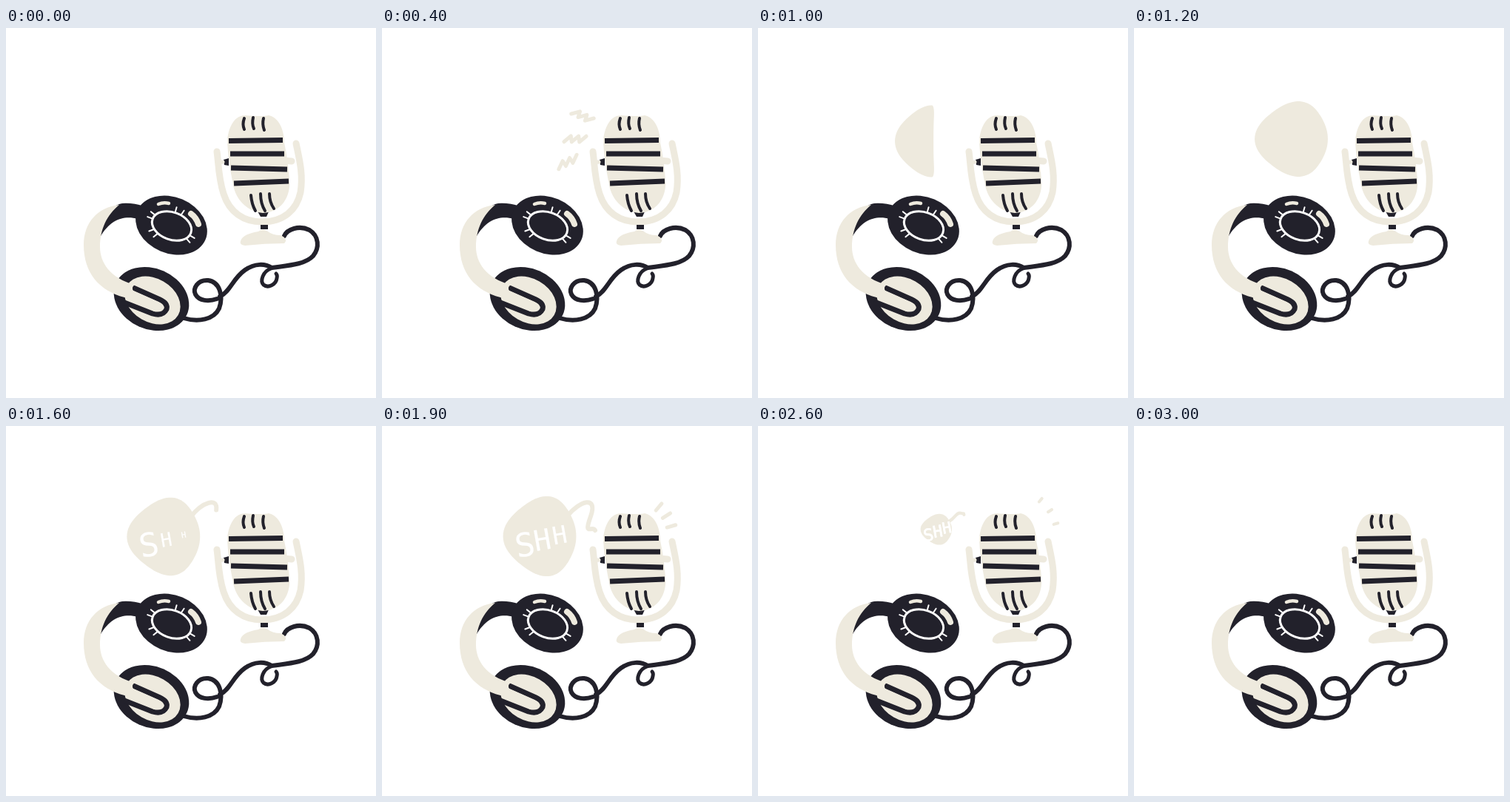
Animation of 500x500 px, one loop 3100 ms. Source, as an HTML page:

```html
<!DOCTYPE html>
<html lang="en">
<head>
<meta charset="utf-8">
<title>Microphone and headphones</title>
<style>
html, body { margin: 0; width: 100%; height: 100%; overflow: hidden; background: #fff; }
svg { display: block; width: 100vw; height: 100vh; }
.cream { fill: #eeeade; }
.dark { fill: #22212b; }
.line { fill: none; stroke-linecap: round; stroke-linejoin: round; }
.lc { stroke: #eeeade; }
.ld { stroke: #22212b; }
text { font-family: "DejaVu Sans Mono", monospace; text-anchor: middle; fill: #fff; stroke: #fff; stroke-linejoin: round; }
</style>
</head>
<body>
<svg viewBox="0 0 500 500" xmlns="http://www.w3.org/2000/svg">
  <!-- cord -->
  <g class="line ld" stroke-width="6">
    <path d="M240 392C260 398 281 394 288 379C294 362 289 343 273 341C259 340 252 352 256 360C261 369 274 370 285 366"/>
    <path d="M289 363C304 355 306 339 323 327C336 318 350 318 359 324C380 321 404 320 415 308C424 297 423 281 410 273C396 266 380 272 376 281"/>
    <path stroke-width="5" d="M358 325C347 329 343 342 348 347C354 352 365 347 366 338Q367 334 365 332"/>
  </g>

  <!-- headphones -->
  <path class="dark" d="M127 283C129 262 139 240 157 237Q172 236 186 241L178 258C160 253 141 258 127 283Z"/>
  <ellipse class="dark" cx="196.500" cy="366" rx="52.500" ry="41" transform="rotate(24 196.500 366)"/>
  <ellipse class="cream" cx="198" cy="368" rx="40" ry="29.500" transform="rotate(30 198 368)"/>
  <path class="line ld" stroke-width="7" d="M172 351L208 367Q219 372 217 380Q212 390 198 386L160 371"/>
  <path class="cream" d="M153 239C124 242 105 263 105 293C105 331 126 355 160 364L200 382Q211 384 213 378Q213 373 206 370L172 355Q169 350 174 347C140 338 127 316 127 296C127 271 137 252 153 239Z"/>
  <ellipse class="dark" cx="223.500" cy="266.500" rx="50" ry="38" transform="rotate(23 223.500 266.500)"/>
  <g class="line" stroke="#fff" transform="translate(224 267.500) rotate(20)">
    <ellipse stroke-width="3" rx="27.500" ry="18.500"/>
    <path id="ticks" stroke-width="2"/>
  </g>
  <g class="line lc">
    <path stroke-width="4.500" d="M206 238Q213 235 220 237"/>
    <path stroke-width="8" d="M250 251Q257 256 260 265"/>
  </g>

  <!-- microphone -->
  <path class="dark" d="M294 178L301 176V186L295 185ZM339 246H356L352 255H344Z"/>
  <path class="line lc" stroke-width="9" d="M285 167C287 180 287 203 294 224C302 249 321 262 346 262C375 262 393 246 398 222C402 197 396 176 392 156M374 179L386 180"/>
  <path class="line lc" stroke-width="5" d="M287 182L293 181"/>
  <path class="dark" d="M344 266H354V272H344Z"/>
  <path class="cream" d="M317 288C319 280 330 277 341 275Q347 270 354 275Q360 280 371 280Q382 285 376 291Q350 291 323 294Q315 293 317 288Z"/>
  <path class="cream" d="M299 153C300 137 307 119 322 118Q347 120 355 118C369 121 376 138 376 155Q381 178 383 205C385 227 373 249 347 250C320 247 309 225 307 212Q300 178 299 153Z"/>
  <g class="line ld">
    <path stroke-width="7" stroke-linecap="butt" d="M301 152.500L374 151.500M303 170L376 170M304 189L380 191M308 210L382 207"/>
    <path stroke-width="4" d="M322 122Q319 130 322 137M334 121Q332 130 335 136M348 122Q346 130 349 138M331 226Q332 238 337 247M344 224Q344 237 350 247M356 224Q356 235 362 244"/>
  </g>

  <g id="zaps" class="line lc"></g>
  <g id="bubble">
    <path id="tail" class="line lc" pathLength="1" stroke-dasharray="1 2"/>
    <path id="blob" class="cream"/>
    <g id="word"></g>
  </g>
  <g id="rays" class="line lc"></g>
</svg>
<script>
const LOOP = 3100, STEP = 100, RAD = Math.PI / 180;
const $ = id => document.getElementById(id);
const set = (el, attrs) => { for (const k in attrs) el.setAttribute(k, attrs[k]); };
const show = (el, on) => { el.style.display = on ? "" : "none"; };
const many = (tag, parent) => [0, 1, 2].map(() =>
  $(parent).appendChild(document.createElementNS("http://www.w3.org/2000/svg", tag)));
const polar = (x, y, rx, ry, deg) => [x + rx * Math.cos(deg * RAD), y + ry * Math.sin(deg * RAD)];
const mix = (a, b, p) => a + (b - a) * p;
const ramp = (t, from, to) => Math.max(0, Math.min(1, (t - from) / (to - from)));

// keys: [[time, numbers], ...]
function tween(t, keys) {
  if (t <= keys[0][0]) return keys[0][1];
  for (let i = 1; i < keys.length; i++) {
    const [t0, a] = keys[i - 1], [t1, b] = keys[i];
    if (t <= t1) return a.map((v, j) => mix(v, b[j], ramp(t, t0, t1)));
  }
  return keys[keys.length - 1][1];
}

// pairs of ticks round the ear pad
set($("ticks"), { d: [20, 130, 190, 275].flatMap(a => [a - 9, a + 9])
  .map(a => `M${polar(0, 0, 28, 19, a)}L${polar(0, 0, 35, 26, a)}`).join("") });

const zaps = many("path", "zaps"), rays = many("path", "rays"), letters = many("text", "word");
zaps.forEach(el => set(el, { pathLength: 1, "stroke-dasharray": "1 2" }));
letters.forEach((el, i) => { el.textContent = "SHH"[i]; });

// sparks zigzag out of the microphone, then straighten along an arc
function drawZaps(t) {
  show($("zaps"), t > 0 && t < 800);
  const reach = ramp(t, 0, 400), p = ramp(t, 400, 700);
  const len = mix(13, 19, p), amp = mix(4, 0, p);
  zaps.forEach((el, i) => {
    const [ax, ay] = polar(250, 156, 36, 42, 240 - 60 * i);
    const x = mix(271 - 10 * i, ax, p), y = mix(119 + 31 * i, ay, p);
    const turn = mix(26 - 25 * i, -30 - 60 * i, p);
    let d = "";
    for (let j = 0; j < 6; j++) {
      const side = j % 2 ? 1 : -1;
      d += `${j ? "L" : "M"}${(j / 2.5 - 1) * len + side * amp / 2} ${-side * amp}`;
    }
    set(el, { d, transform: `translate(${x} ${y}) rotate(${turn})`,
      "stroke-width": mix(5, 8, p), "stroke-dashoffset": reach - 1 });
  });
}

// the right half starts folded over the left one and swings open
function blobPath(x, y, rx, ry, fold) {
  const pts = [];
  for (let a = 0; a < 360; a += 4) {
    const c = Math.cos(a * RAD), s = Math.sin(a * RAD), r = 1 + .03 * Math.cos(4 * a * RAD);
    pts.push([x + rx * r * c * (c > 0 ? fold : 1) + .2 * rx * s * s, y + ry * r * s]);
  }
  return "M" + pts.join("L") + "Z";
}

const blobKeys = [
  [800, [241, 156, 33, 45, -.5]],
  [1200, [212.5, 150, 48, 49.5, 1]],
  [1900, [213, 149, 48, 52.5, 1]],
  [2300, [213, 146.5, 39, 38.5, 1]]
];
const tailKeys = [
  [1900, [250, 122, 268, 100, 292, 94, 282, 122, 284, 134, 288, 141]],
  [2300, [246, 126, 262, 118, 264, 102, 276, 105, 281, 104, 284, 109]]
];

function drawBubble(t) {
  show($("bubble"), t >= 800 && t < 2900);
  set($("blob"), { d: blobPath(...tween(t, blobKeys)) });
  const grow = ramp(t, 1200, 1900), shrink = ramp(t, 1900, 2300);
  const [x, y, ...rest] = tween(t, tailKeys);
  show($("tail"), grow > 0);
  set($("tail"), { d: `M${x} ${y}C${rest.slice(0, 6)}S${rest.slice(6)}`,
    "stroke-width": mix(6, 8, shrink), "stroke-dashoffset": 1 - grow });
  const s = 1 - .12 * ramp(t, 2300, 2400) - .88 * ramp(t, 2400, 2900);
  set($("bubble"), { transform: `translate(272 132) scale(${s}) translate(-272 -132)` });

  letters.forEach((el, i) => {
    const start = 1300 + 100 * i;
    const size = mix(44 - 5.5 * i, 43 - 2 * i, shrink) * ramp(t, start, start + 300);
    show(el, t > start);
    set(el, { transform: `translate(${193 + 23.5 * i} ${160 - mix(6.5, 9, shrink) * i}) rotate(-10)`,
      y: size * .365, "font-size": size, "stroke-width": mix(.2, 1.6, shrink) });
  });
}

const rayKeys = [[1600, [43, 43, 2]], [1800, [43, 50, 4]], [1900, [47, 59, 5]],
  [2300, [54, 66, 6]], [2400, [56, 68, 6]], [2800, [68, 68, 2]]];

function drawRays(t) {
  show($("rays"), t > 1600 && t < 2800);
  const [near, far, width] = tween(t, rayKeys);
  rays.forEach((el, i) => {
    const end = r => polar(340, 150, r, r, 17 * i - 50);
    set(el, { d: `M${end(near)}L${end(far)}`, "stroke-width": width });
  });
}

function tick() {
  const t = Math.floor(performance.now() % LOOP / STEP) * STEP;
  drawZaps(t);
  drawBubble(t);
  drawRays(t);
  requestAnimationFrame(tick);
}
tick();
</script>
</body>
</html>
```
